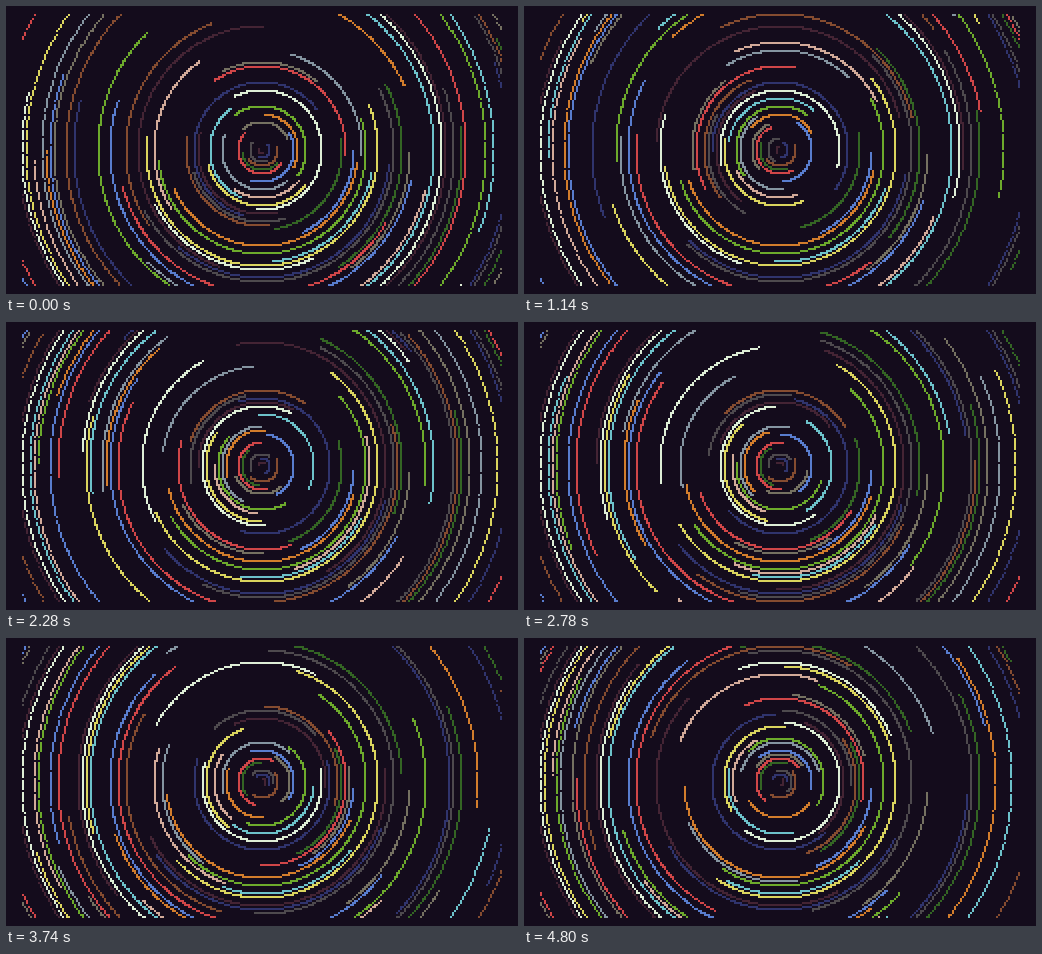
An HTML page with a canvas that plays this animation: 512x288 px, repeating every 4.82 s.

```html
<!DOCTYPE html>
<html lang="en">
<head>
<meta charset="utf-8">
<title>Rotating arcs</title>
<style>
html, body { margin: 0; width: 100%; height: 100%; overflow: hidden; background: #140c1c; }
canvas { display: block; }
</style>
</head>
<body>
<canvas id="stage" width="512" height="288"></canvas>
<script>
const LOOP = 4820, STEP = 20, LEAD = 1.7;
const COLS = 240, ROWS = 136, CELL = 2, LEFT = 16, TOP = 8;
const RAD = Math.PI / 180;

const palette = ['#442434', '#30346d', '#4e4a4e', '#854c30', '#346524',
  '#d04648', '#757161', '#597dce', '#d27d2c', '#8595a1',
  '#6daa2c', '#d2aa99', '#6dc2ca', '#dad45e', '#deeed6'];

// One ring per pair, from the centre out: speed in degrees per second, length in degrees.
const rings = [
  [50, 120], [-25, 160], [40, 150], [-6, 160], [25, 130],
  [20, 190], [-78, 110], [-20, 143], [-50, 115], [30, 150],
  [-76, 165], [24, 85], [67, 120], [23, 126], [-68.4, 211],
  [45, 120], [63, 217], [42, 90], [50, 105], [-4.4, 88],
  [-73, 128], [-68, 65], [0.7, 62], [4.3, 149], [-43, 76],
  [-10.5, 192], [86.5, 88], [7, 73], [-13.4, 210], [38.4, 88],
  [65, 160], [4, 124], [-16, 180], [86, 102], [-16.3, 85],
  [18, 135], [0.7, 52], [7, 187], [-47, 56], [43, 63],
  [62, 120], [8.3, 90], [-47.5, 202], [30, 77], [-44, 140],
  [-40, 120], [56, 100], [-11, 120], [80, 95], [-4, 70],
  [-46, 120], [72, 115], [30, 150], [50, 95], [75, 110],
  [-45, 140], [28, 130], [-64, 130], [75, 115], [20, 160],
  [20, 150], [-12, 90], [-30, 120], [-70, 130], [-15, 70],
  [78, 120], [-40, 110], [30, 110], [44, 105]
];

const ctx = document.getElementById('stage').getContext('2d');

function dot(x, y) {
  if (x < 0 || y < 0 || x >= COLS || y >= ROWS) return;
  ctx.fillRect(LEFT + Math.floor(x) * CELL, TOP + Math.floor(y) * CELL, CELL, CELL);
}

function draw(ms) {
  const time = LEAD + Math.floor(ms % LOOP / STEP) * STEP / 1000;
  ctx.fillStyle = '#140c1c';
  ctx.fillRect(0, 0, 512, 288);
  rings.forEach(([speed, length], i) => {
    const radius = 2 * (i + 1), start = speed * time * RAD;
    ctx.fillStyle = palette[i % palette.length];
    for (let a = 0; a <= length * RAD; a += 0.01) {
      dot(COLS / 2 + radius * Math.cos(start + a), ROWS / 2 + radius * Math.sin(start + a));
    }
  });
}

const begin = performance.now();
function tick() {
  draw(performance.now() - begin);
  requestAnimationFrame(tick);
}
tick();
</script>
</body>
</html>
```
